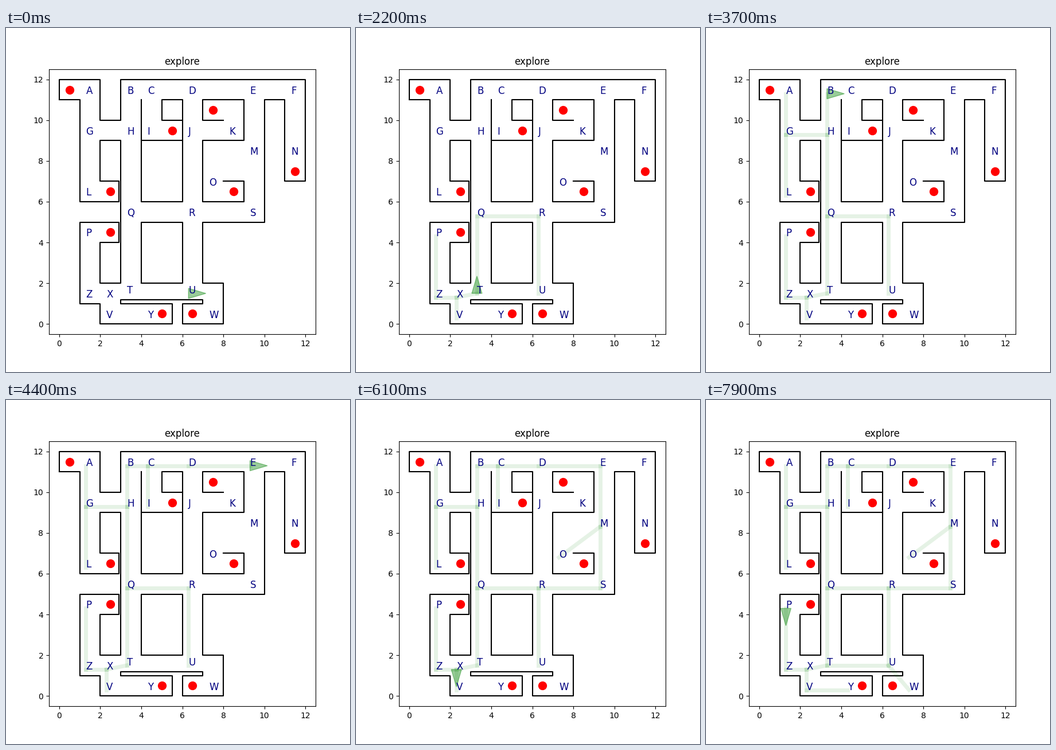
Write a matplotlib script that moves like this. It is 600 by 600 pixels and loops after 8 s.

```python
import matplotlib.pyplot as plt
from matplotlib.animation import FuncAnimation
from matplotlib.patches import Polygon

NODES = {
    "A": (1.3, 11.3), "B": (3.3, 11.3), "C": (4.3, 11.3), "D": (6.3, 11.3),
    "E": (9.3, 11.3), "F": (11.3, 11.3), "G": (1.3, 9.3), "H": (3.3, 9.3),
    "I": (4.3, 9.3), "J": (6.3, 9.3), "K": (8.3, 9.3), "L": (1.3, 6.3),
    "M": (9.3, 8.3), "N": (11.3, 8.3), "O": (7.3, 6.8), "P": (1.3, 4.3),
    "Q": (3.3, 5.3), "R": (6.3, 5.3), "S": (9.3, 5.3), "T": (3.3, 1.5),
    "U": (6.3, 1.5), "V": (2.3, 0.3), "W": (7.3, 0.3), "X": (2.3, 1.3),
    "Y": (4.3, 0.3), "Z": (1.3, 1.3),
}
HEADINGS = {"N": (0, 1), "E": (1, 0), "S": (0, -1), "W": (-1, 0)}
GOALS = [(0.5, 11.5), (7.5, 10.5), (5.5, 9.5), (11.5, 7.5), (2.5, 6.5),
         (8.5, 6.5), (2.5, 4.5), (5, 0.5), (6.5, 0.5)]

# Each wall: a start point, then alternating x / y targets.
WALLS = [
    ((0, 11), "y", [12, 2, 10, 3, 12, 12, 7, 11, 11, 10, 5, 7, 2, 8, 0, 6, 1,
                    7, 1.2, 3, 1, 5.5, 0, 2, 1, 1, 5, 2.9, 4, 2, 2, 3, 9, 2,
                    7, 2.9, 6, 1, 11, 0]),
    ((4, 11), "y", [6, 6, 11, 5, 10, 6]),
    ((4, 9), "x", [6]),
    ((4, 2), "x", [6, 5, 4, 2]),
    ((8, 10), "x", [7, 11, 9, 9, 7, 6, 9, 7, 8]),
]

# One pose per step: node, then heading.
WALK = """
UE UN RN RW QW QS TS TW XW XS VE VN VE VN XN XW ZN PE PS ZE
XE TE TN QN HN HW GW GS LE GN AW AS GS GE HE HN BN BE CE CS
IE CN CE DE EE ES MS MW OE ME MS SS SW RW RN RW QW QS TS TW
XW XS XE XS XE TE UE WW UW TW XW XS VE YS VN XN XW ZN PE PS
""".split()


def wall_points(start, axis, targets):
    x, y = start
    pts = [(x, y)]
    for t in targets:
        if axis == "x":
            x, axis = t, "y"
        else:
            y, axis = t, "x"
        pts.append((x, y))
    return pts


def arrow(pose, length=0.85, half=0.25):
    x, y = NODES[pose[0]]
    dx, dy = HEADINGS[pose[1]]
    return [(x - dy * half, y + dx * half),
            (x + dx * length, y + dy * length),
            (x + dy * half, y - dx * half)]


fig, ax = plt.subplots(figsize=(6, 6), dpi=100)
ax.set(xlim=(-0.5, 12.5), ylim=(-0.5, 12.5), title="explore")

for wall in WALLS:
    ax.plot(*zip(*wall_points(*wall)), color="black", lw=1.5)
ax.plot(*zip(*GOALS), "ro", ms=10)
for name, (x, y) in NODES.items():
    ax.text(x, y, name, fontsize=12, color="navy")

# Every corridor becomes visible the first time it is walked.
trail, seen = [], set()
for step in range(1, len(WALK)):
    a, b = WALK[step - 1][0], WALK[step][0]
    edge = frozenset((a, b))
    if a != b and edge not in seen:
        seen.add(edge)
        line, = ax.plot(*zip(NODES[a], NODES[b]), color="green", lw=5, alpha=0.1)
        trail.append((step, line))

robot = ax.add_patch(Polygon(arrow(WALK[0]), closed=True, color="green", alpha=0.4))


def update(i):
    robot.set_xy(arrow(WALK[i]))
    for step, line in trail:
        line.set_visible(step <= i)
    return [robot] + [line for _, line in trail]


ani = FuncAnimation(fig, update, frames=len(WALK), interval=100, repeat=True)
plt.show()
```
